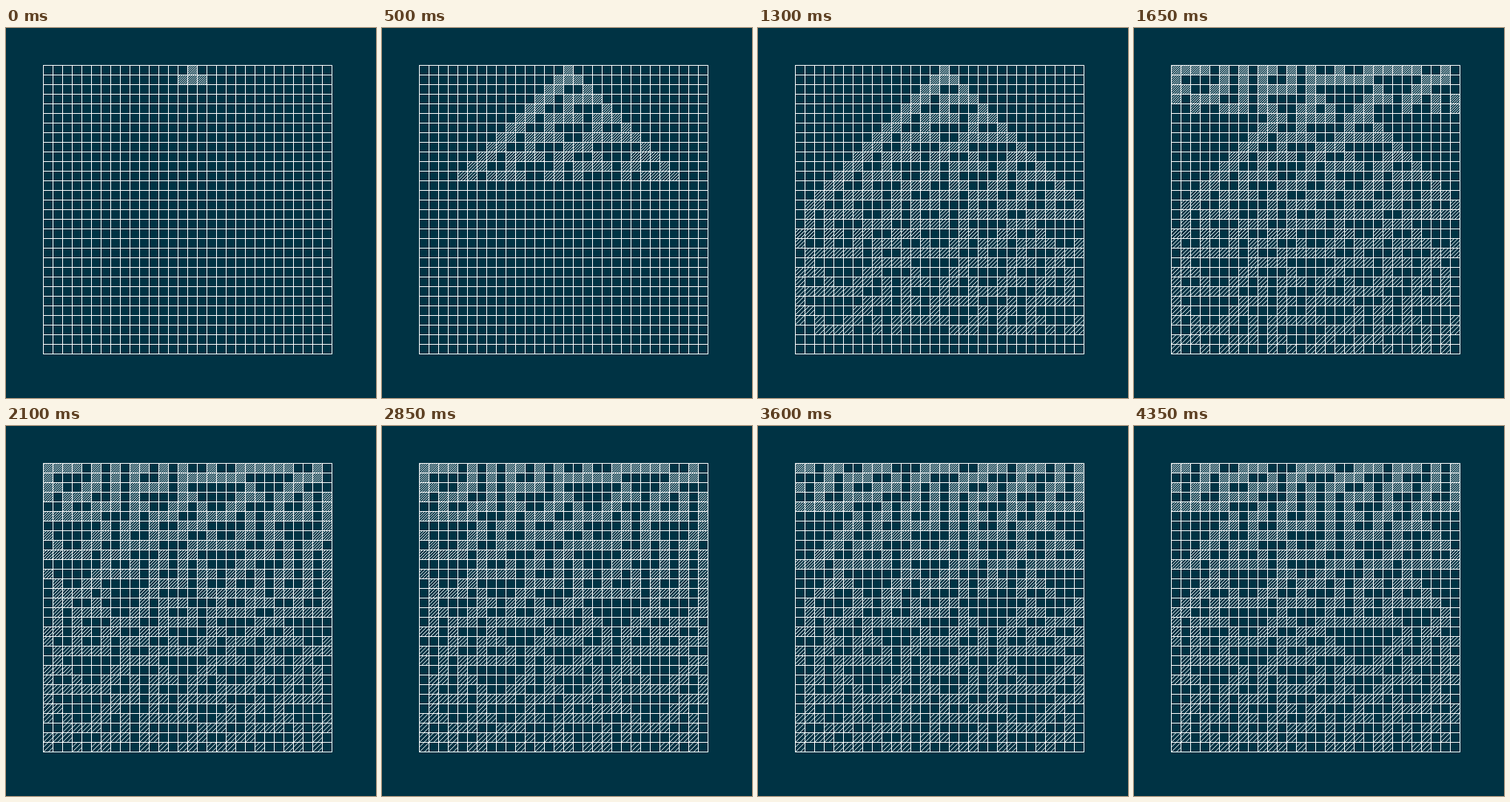
An HTML page with a canvas for the animation above (4.4 s loop, 500 by 500 pixels).

```html
<!DOCTYPE html>
<html>
<head>
<meta charset="utf-8">
<style>
html, body { margin: 0; height: 100%; overflow: hidden; background: #003344; }
canvas { display: block; }
</style>
</head>
<body>
<canvas id="stage" width="500" height="500"></canvas>
<script>
const N = 30, CELL = 13, LEFT = 50.5, STEP = 50, STEPS = 88;
const ctx = document.getElementById('stage').getContext('2d');
ctx.strokeStyle = '#fff';

// Rule 30 on a ring of N cells
const rows = [Array.from({ length: N }, (_, i) => +(i === 15))];
for (let r = 0; r < STEPS; r++) {
  const p = rows[r];
  rows.push(p.map((c, i) => p[(i + N - 1) % N] ^ (c | p[(i + 1) % N])));
}

function line(x1, y1, x2, y2) {
  ctx.moveTo(x1, y1);
  ctx.lineTo(x2, y2);
}

function grid() {
  const end = LEFT + N * CELL;
  for (let i = 0; i <= N; i++) {
    const at = LEFT + i * CELL;
    line(at, LEFT - 0.5, at, end + 0.5);
    line(LEFT - 0.5, at, end + 0.5, at);
  }
}

// Diagonal strokes inside one cell, gap apart along its edges
function hatch(x, y, gap) {
  for (let d = gap; d < 2 * CELL; d += gap) {
    const near = Math.max(0, d - CELL), far = Math.min(d, CELL);
    line(x + near, y + far, x + far, y + near);
  }
}

function draw(now) {
  const last = Math.floor(now / STEP) % STEPS + 1;
  ctx.fillStyle = '#003344';
  ctx.fillRect(0, 0, 500, 500);
  ctx.beginPath();
  grid();
  for (let r = Math.max(0, last - N + 1); r <= last; r++) {
    const y = r % N;
    rows[r].forEach((on, x) => {
      if (on) hatch(LEFT + x * CELL, LEFT + y * CELL, 2.8 + 0.13 * y);
    });
  }
  ctx.stroke();
  requestAnimationFrame(draw);
}
requestAnimationFrame(draw);
</script>
</body>
</html>
```
